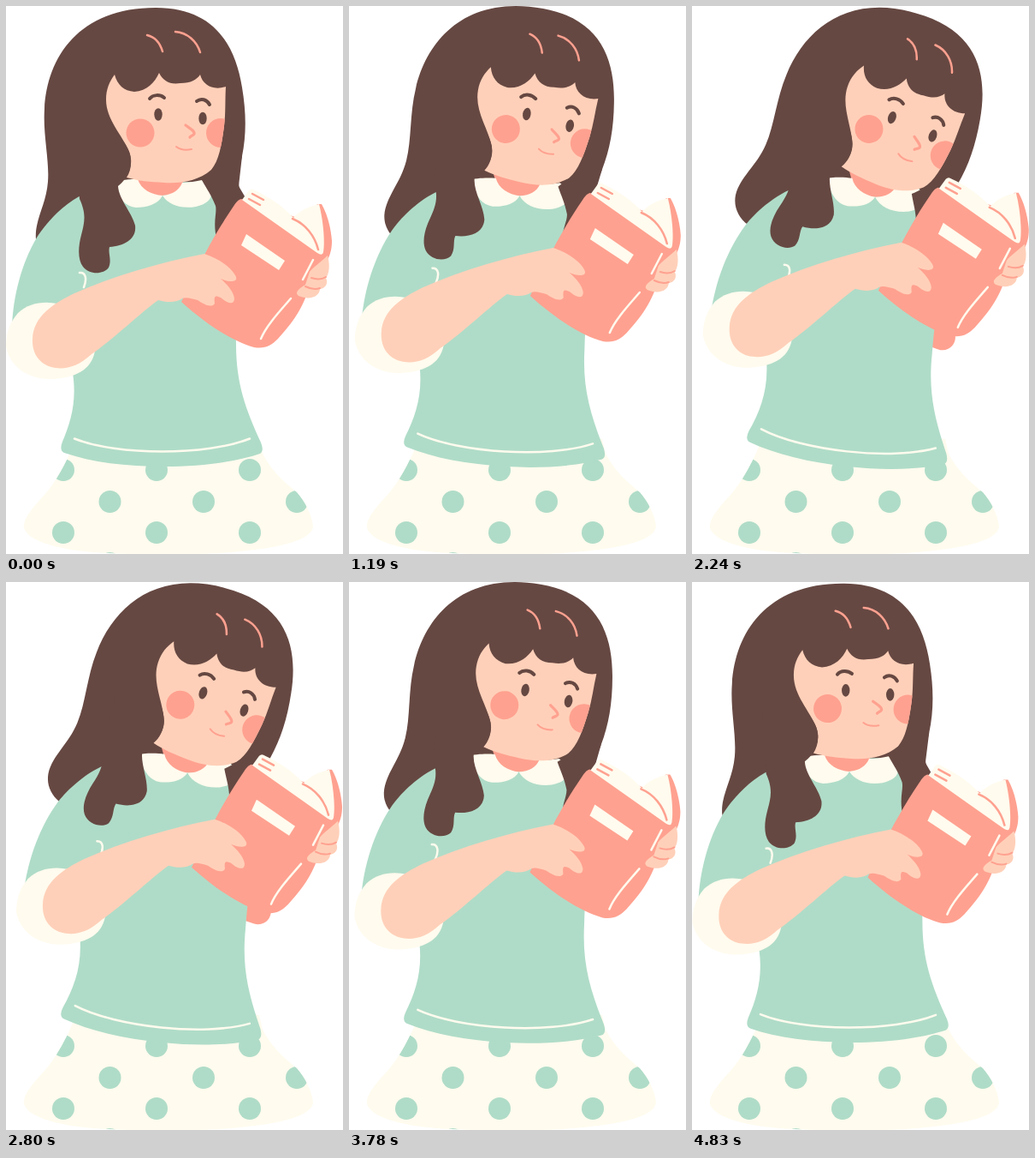
An HTML page for the animation above (4.9 s loop, 394x639 px).

```html
<!DOCTYPE html>
<html lang="en">
<head>
<meta charset="utf-8">
<title>Girl reading</title>
<style>
  html, body { margin: 0; width: 100%; height: 100%; overflow: hidden; background: #fff; }
  svg { display: block; width: 394px; height: 639px; }
  .hair { fill: #664842; }
  .skin { fill: #ffd0b9; }
  .pink { fill: #ffa190; }
  .mint { fill: #afdcc8; }
  .cream { fill: #fffbee; }
  .line { fill: none; stroke-width: 2.5; stroke-linecap: round; stroke-linejoin: round; }
  .line.pink { stroke: #ffa190; fill: none; }
  .line.cream { stroke: #fffbee; fill: none; }
  .line.hair { stroke: #664842; fill: none; stroke-width: 4; }
</style>
</head>
<body>
<svg viewBox="0 0 394 639">
  <defs>
    <path id="skirt" d="M84 500C72 530 60 553 45 570C32 584 20 598 21 608C24 624 65 636 120 638C160 640 225 640 262 637C310 633 357 625 359 607C358 595 350 578 340 567C325 555 311 543 300 522L296 505Z"/>
    <path id="face" d="M127 80C130 92 138 99 150 100C165 99 174 89 179 78C184 88 192 92 204 90C216 90 223 86 227 80C230 92 242 99 257 94C256 110 257 125 255 140C252 163 249 180 240 191C225 204 205 207 185 206C168 205 155 204 141 200C146 192 148 182 144 170C136 150 117 133 117 109C117 97 121 88 127 80Z"/>
    <clipPath id="inSkirt"><use href="#skirt"/></clipPath>
    <clipPath id="inFace"><use href="#face"/></clipPath>
  </defs>

  <g class="head">
    <rect class="pink" x="280" y="334" width="53" height="30" rx="15"/>
    <path class="hair" d="M35 272C33 250 47 232 49 205C51 180 43 150 45 120C48 60 85 2 175 2C243 2 268 45 276 95C281 125 281 150 276 175C272 192 271 205 273 213C276 222 285 228 290 235L247 275L110 290L60 300C47 296 37 286 35 272Z"/>
  </g>

  <use href="#skirt" class="cream"/>
  <g id="dots" class="mint" clip-path="url(#inSkirt)"></g>

  <g id="body">
    <path class="mint" d="M131 206L92 219C66 230 44 257 36 270C18 300 8 340 7 375L78 428C83 460 76 485 66 508Q62 518 68 521C100 532 140 537 185 537C230 537 270 531 297 522Q302 519 298 509C280 470 269 440 269 395C268 340 268 300 285 250L260 230L232 205Z"/>
    <path class="pink" d="M150 195H212L206 207C203 217 192 221 181 221C168 221 158 215 154 205Z"/>
    <path class="cream" d="M118 207C135 202 145 202 154 202C158 214 170 220 183 221C178 231 165 235 152 235C140 234 133 225 128 214ZM183 221C190 232 205 237 222 234C234 231 240 226 240 219C237 211 233 205 229 203C220 205 212 206 206 206C203 214 195 220 183 221Z"/>
    <path class="line cream" d="M80 504.500C130 524.500 235 524.500 285 504.500M86 311C93 310 95 318 91 328"/>
  </g>

  <g class="head">
    <use href="#face" class="skin"/>
    <g class="pink" clip-path="url(#inFace)">
      <circle cx="157" cy="148" r="16.5"/>
      <circle cx="251" cy="148" r="17"/>
    </g>
    <path class="hair" d="M120 140C134 152 148 168 146 183C145 192 142 201 131 210C132 226 147 240 151 256C153 272 138 280 121 281C119 288 124 296 120 305C114 313 98 314 90 304C84 296 84 282 88 267C92 252 94 242 86 225L80 150ZM258 150C252 175 246 188 229 203C235 214 240 220 245 233C247 242 241 252 247 275L285 232L272 210L276 175Z"/>
    <g class="hair">
      <ellipse cx="178" cy="126.500" rx="4.7" ry="7.3"/>
      <ellipse cx="230" cy="131" rx="4.7" ry="7.3"/>
    </g>
    <path class="line hair" d="M168 108C172 103 180 103 185 107M223 111C228 107 235 109 238 115"/>
    <path class="line pink" style="stroke-width:3.200" d="M210 139C214 142 221 146 220 149C219 151 217 151 215 153"/>
    <path class="line pink" d="M165 34C174 36 180 43 183 53M198 30C212 31 223 41 227 54"/>
    <path class="line pink" style="stroke-width:2" d="M199 164C204 168 212 168 217 167"/>
  </g>

  <g id="arm">
    <path class="pink" d="M275 225C271 226 269 229 265 235C254 251 242 271 232 290L205 345C235 372 265 391 290 398C303 400 310 396 318 388C340 364 350 346 356 322L376 296C380 288 381 281 381 274C380 260 376 243 369 231L364 231L350 250Z"/>
    <path class="cream" d="M276 226L284 215Q287 212 291 215C308 223 323 233 336 247C344 238 354 234 366 231C371 250 373 275 371 287Q370 292 364 288Z"/>
    <path class="line pink" d="M288 219L301 226M284 225L297 232M335 248C350 254 361 268 365 284"/>
    <path class="cream" d="M281 266L326 297L319 308L275 279Z"/>
    <path class="line cream" d="M298 388C304 373 320 356 333 341M347 319L359 296"/>
    <path class="skin" d="M355 310C360 304 366 300 376 291C379 302 378 312 374 317C377 323 374 329 367 330C367 338 356 344 342 338C337 334 342 330 350 325Z"/>
    <path class="line pink" style="stroke-width:2" d="M357 317C363 319 369 319 374 316M350 327C356 330 361 331 367 329"/>
    <path class="cream" d="M75 352C55 343 30 343 14 358C3 370 0 385 0 397C6 425 30 435 52 435C80 434 100 425 104 402Z"/>
    <path class="skin" d="M31 388C32 362 55 347 80 335C125 315 180 299 232 289C245 293 262 303 268 314C273 322 262 323 251 318C259 325 266 333 267 341C267 349 259 347 251 340C244 337 243 338 244 347C240 353 230 347 224 343C217 341 211 339 206 341C200 346 188 346 178 343C158 357 125 389 100 406C85 420 70 424 58 422C42 420 30 408 31 388Z"/>
  </g>
</svg>
<script>
  const LOOP = 4900, STEP = 70;
  const heads = document.querySelectorAll('.head');
  const body = document.getElementById('body');
  const arm = document.getElementById('arm');

  const dots = [[67, 541], [176, 541], [285, 541], [121.5, 578], [231, 578], [340, 578],
                [67, 614], [176, 614], [285, 614], [121.5, 650]];
  document.getElementById('dots').innerHTML =
    dots.map(([x, y]) => `<circle cx="${x}" cy="${y}" r="13"/>`).join('');

  // lean goes 0 → 1 → 0 at constant speed over one loop
  function pose(lean) {
    for (const head of heads) head.setAttribute('transform', `rotate(${21 * lean} 195.4 293.4)`);
    body.setAttribute('transform', `rotate(${6.8 * lean} 183 508)`);
    arm.setAttribute('transform', `translate(${14 * lean} ${-14.4 * lean})`);
  }

  const start = performance.now();
  function tick() {
    const t = Math.floor((performance.now() - start) % LOOP / STEP) * STEP;
    pose(1 - Math.abs(1 - 2 * t / LOOP));
    requestAnimationFrame(tick);
  }
  tick();
</script>
</body>
</html>
```
